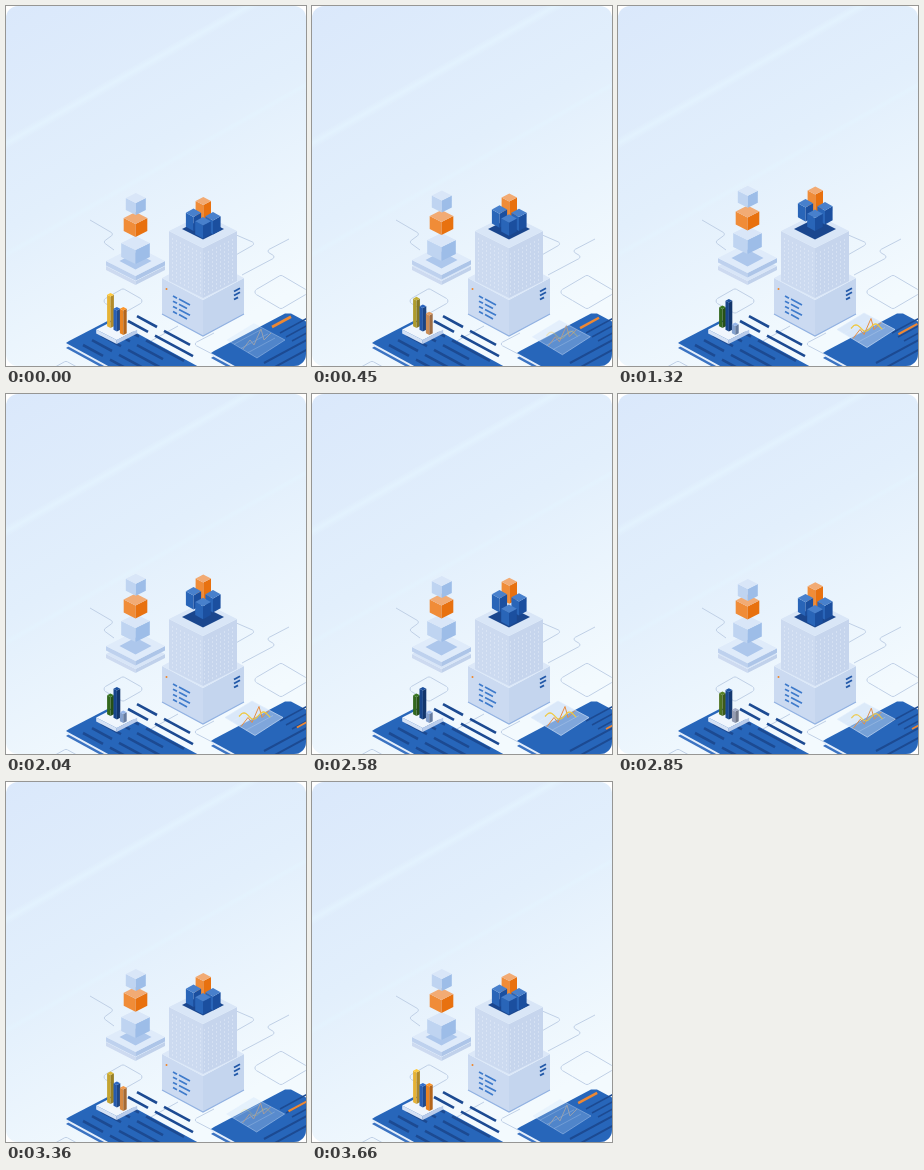
Write an HTML page with a canvas that moves like this. It is 300 px wide and 360 px high and loops after 3.69 s.

```html
<!DOCTYPE html>
<html lang="en">
<head>
<meta charset="utf-8">
<title>Isometric data blocks</title>
<style>
html, body { margin: 0; width: 100%; height: 100%; overflow: hidden; background: #fff; }
canvas { display: block; width: 300px; height: 360px; }
</style>
</head>
<body>
<canvas id="stage"></canvas>
<script>
const LOOP = 3690, W = 300, H = 360, ISO = .54;
const canvas = document.getElementById('stage');
const g = canvas.getContext('2d');
const dpr = window.devicePixelRatio || 1;
canvas.width = W * dpr;
canvas.height = H * dpr;

const mix = (a, b, p) => a + (b - a) * p;
const blend = (a, b, p) => `rgb(${a.map((c, i) => Math.round(mix(c, b[i], p))).join()})`;

// Eased 0..1 ramp between two times.
const ramp = (t, from, to) =>
  (1 - Math.cos(Math.PI * Math.min(1, Math.max(0, (t - from) / (to - from))))) / 2;
// Rises until `up`, holds, then falls back between `down` and `rest`.
const lift = (t, up, down, rest) => ramp(t, 0, up) - ramp(t, down, rest);
const early = t => lift(t, 1150, 2200, 3200);
const late = t => lift(t, 1200, 2550, LOOP);

function path(pts, close) {
  g.beginPath();
  pts.forEach(([x, y]) => g.lineTo(x, y));
  if (close) g.closePath();
}
function poly(color, ...pts) {
  path(pts, true);
  g.fillStyle = color;
  g.fill();
}
function line(color, width, ...pts) {
  path(pts);
  g.strokeStyle = color;
  g.lineWidth = width;
  g.stroke();
}
// Line along an isometric axis: dir 1 runs down to the right, -1 up to the right.
function isoLine(color, width, x, y, len, dir) {
  line(color, width, [x, y], [x + len, y + len * ISO * dir]);
}
const rhomb = (cx, cy, hw, hh) => [[cx - hw, cy], [cx, cy - hh], [cx + hw, cy], [cx, cy + hh]];

// Box whose uppermost corner is at (cx, top).
function box(cx, top, hw, hh, h, [up, left, right]) {
  const y = top + hh, f = y + hh;
  poly(left, [cx - hw, y], [cx, f], [cx, f + h], [cx - hw, y + h]);
  poly(right, [cx + hw, y], [cx, f], [cx, f + h], [cx + hw, y + h]);
  poly(up, ...rhomb(cx, y, hw, hh));
}
// Open or closed floor line with softened corners.
function wire(pts, close) {
  const n = pts.length;
  g.beginPath();
  if (close) {
    g.moveTo((pts[n - 1][0] + pts[0][0]) / 2, (pts[n - 1][1] + pts[0][1]) / 2);
    pts.forEach((p, i) => g.arcTo(...p, ...pts[(i + 1) % n], 3));
    g.closePath();
  } else {
    g.moveTo(...pts[0]);
    for (let i = 1; i < n - 1; i++) g.arcTo(...pts[i], ...pts[i + 1], 2);
    g.lineTo(...pts[n - 1]);
  }
  g.strokeStyle = '#c0d0e6';
  g.lineWidth = 1;
  g.stroke();
}

const PALE = ['#d9e6f8', '#bfd4f1', '#9dbde8'];
const ORANGE = ['#f2ab74', '#f08c38', '#e8710f'];
const BLUE = ['#4880cc', '#2965b8', '#1b4f9f'];
const TABLET = '#2766ba', INK = '#1c4a92';

function background() {
  const fill = g.createLinearGradient(0, 0, 190, 340);
  fill.addColorStop(0, '#dae8fb');
  fill.addColorStop(.5, '#e2effc');
  fill.addColorStop(1, '#f3fafe');
  g.fillStyle = fill;
  g.fillRect(0, 0, W, H);
  const streak = (y, w, alpha) => {
    const s = g.createLinearGradient(0, y, w * .43, y + w * .76);
    [0, alpha, 0].forEach((a, i) => s.addColorStop(i / 2, `rgba(228,244,255,${a})`));
    poly(s, [0, y], [W, y - 168], [W, y - 168 + w], [0, y + w]);
  };
  streak(131, 13, .75);
  streak(244, 9, .6);
}

function wires() {
  wire([[84, 214], [108, 228], [97, 236], [108, 244]]);
  wire([[228, 228], [250, 237.5], [228, 250]]);
  wire([[283, 233], [260, 245], [270, 251], [236, 269]]);
  wire(rhomb(275, 286, 29, 17), true);
  wire(rhomb(117, 295, 22, 12.5), true);
  wire(rhomb(60, 366, 20, 11), true);
  wire([[145, 335], [172, 320]]);
  wire([[208, 327], [187, 338], [210, 350]]);
}

function stack(t) {
  const cx = 129.5, dy = -3 * early(t), soft = late(t);
  box(cx, 245, 29.5, 15, 4, ['#d8e5f7', '#cddaf0', '#c0d1eb']);
  box(cx, 240 + dy, 29.5, 15, 4.5, ['#dfebfa', '#bed1ee', '#adc5e8']);
  poly('#adc7ec', ...rhomb(cx, 255 + dy, 16, 8.5));
  box(cx, 230 - 10 * soft, 14.3, 7, 14, PALE);
  box(cx, 206 - 6.5 * soft, 11.8, 6, 13, ORANGE);
  box(cx + .3, 187 - 7.3 * early(t), 10, 5, 12, PALE);
}

function tower(t) {
  box(197, 250, 41, 22, 36, ['#dce8f8', '#cbdaf1', '#c4d5ee']);
  line('#92b2e2', 1.3, [156, 308], [197, 330], [238, 308]);
  box(197, 208, 34, 17, 50, ['#d9e6f7', '#ccdaf0', '#c6d5ed']);

  g.fillStyle = 'rgba(240,246,254,.75)';
  for (let x = 3; x < 67; x += 4) {
    const y0 = 225 + (x < 34 ? x : 68 - x) / 2;
    for (let y = 6; y < 49; y += 4) g.fillRect(163 + x, y0 + y, 1, 1);
  }

  poly('#1a468e', ...rhomb(197, 223, 21, 10.5));
  const rise = early(t);
  box(197.3, 191 - 10.5 * rise, 7.7, 4, 18, ORANGE);
  box(187.5, 202.5 - 9.5 * rise, 7.6, 4.2, 14, BLUE);
  box(207, 206 - 10 * rise, 7.6, 4.2, 14, BLUE);
  box(197, 211 - 7.5 * lift(t, 1100, 1950, 2700), 7.8, 4.2, 13, BLUE);

  g.fillStyle = '#ef8528';
  g.beginPath();
  g.arc(160.5, 283, 1, 0, 7);
  g.fill();
  for (let i = 0; i < 4; i++) {
    const y = 290 + i * 5.2;
    isoLine('#3f7bcb', 1.7, 167, y, 4, 1);
    isoLine('#3f7bcb', 1.7, 173, y + 3, i % 2 ? 8 : 11, 1);
  }
  for (let i = 0; i < 3; i++) isoLine('#2158a8', 1.8, 228, 285.5 + i * 4, i < 2 ? 6 : 4, -1);
}

// Floor slab seen from its left tip; the far ends run off the stage.
function tablet(x, y, back) {
  const slab = (color, dy) => poly(color,
    [x, y + dy], [x + 3, y - 2 + dy], [x + back - 3, y - back * ISO + 2 + dy],
    [x + back + 3, y - back * ISO + 2 + dy], [x + back + 93, y - back * ISO + 51 + dy],
    [x + 99, y + 54 + dy]);
  slab('#3b73c2', 5);
  slab('#e4eefb', 2.2);
  slab(TABLET, 0);
}

function leftTablet() {
  tablet(60, 337, 45);
  for (let i = 0; i < 7; i++) {
    const x = 77 + i * 9, y = 339 - i * 4.8;
    isoLine(INK, 2.6, x, y, 20, 1);
    isoLine(INK, 2.6, x + 27, y + 27 * ISO, i % 3 ? 38 : 26, 1);
  }
}

function chart(p) {
  box(110.7, 313, 20.5, 10.5, 4, ['#f0f6fd', '#d5e2f5', '#b9cceb']);
  const bar = (i, from, to, a, b) => {
    const top = mix(from, to, p), foot = 322 + i * 3.5;
    const faces = [1.08, .96, .74].map(k => blend(a.map(c => c * k), b.map(c => c * k), p));
    box(104.5 + i * 6.4, top, 3.4, 1.8, foot - top - 3.6, faces);
  };
  bar(0, 287, 299.5, [240, 186, 55], [52, 108, 30]);
  bar(1, 301, 293, [43, 100, 190], [24, 72, 145]);
  bar(2, 301, 316.5, [243, 137, 35], [138, 168, 216]);
}

function panel(p) {
  g.save();
  g.translate(-2 * p, -10.5 * p);
  path([[221, 334], [248, 317.5], [279, 334], [251, 352]], true);
  g.fillStyle = `rgba(198,219,246,${mix(.26, .55, p)})`;
  g.fill();
  g.strokeStyle = `rgba(222,235,252,${mix(.4, .75, p)})`;
  g.lineWidth = .8;
  g.stroke();
  for (let i = 1; i < 4; i++) {
    isoLine('rgba(235,244,255,.35)', .6, 221 + i * 7, 334 + i * 4.2, 27, -1);
  }
  line(blend([150, 160, 176], [232, 142, 66], p), 1,
    [237, 343], [244, 334], [248, 339], [255, 323], [258, 334], [265, 327]);
  const wave = Array.from({ length: 25 }, (_, i) =>
    [235 + i * 1.3, 333 - i * .06 + Math.sin(i * .42) * -3.4]);
  line(`rgba(240,200,60,${p})`, 1.2, ...wave);
  g.restore();
}

function rightTablet(t, p) {
  tablet(205, 347, 77);
  for (let i = 0; i < 3; i++) isoLine(INK, 1.6, 274 + i * 6, 327 + i * 4, 28, -1);
  for (let i = 0; i < 2; i++) isoLine(INK, 2, 258 + i * 9, 357 + i * 5, 45, -1);
  const shift = 28 * lift(t, 2600, 3100, LOOP);
  isoLine('#ee8833', 2.6 - shift * .03, 266 + shift, 321 + shift * .5, 19, -1);
  panel(p);
}

function draw(t) {
  g.setTransform(dpr, 0, 0, dpr, 0, 0);
  g.clearRect(0, 0, W, H);
  g.save();
  g.beginPath();
  g.roundRect(0, 0, W, H, 12);
  g.clip();
  const p = late(t);
  background();
  wires();
  stack(t);
  tower(t);
  leftTablet();
  chart(p);
  rightTablet(t, p);
  g.restore();
}

const start = performance.now();
function tick() {
  draw((performance.now() - start) % LOOP);
  requestAnimationFrame(tick);
}
tick();
</script>
</body>
</html>
```
